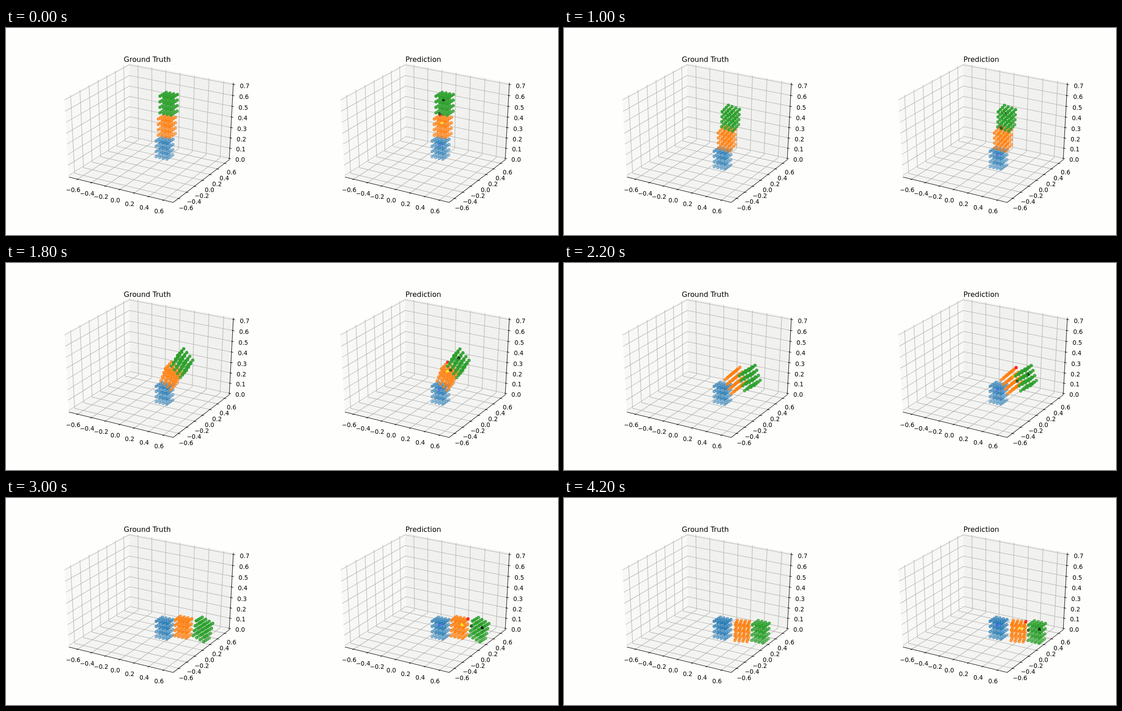
Write an HTML page with a canvas that moves like this. It is 1222 px wide and 458 px high and loops after 4.27 s.

```html
<!DOCTYPE html>
<html lang="en">
<head>
<meta charset="utf-8">
<title>Ground truth and prediction</title>
<style>
  html, body { margin: 0; width: 100%; height: 100%; overflow: hidden; background: #fefefc; }
  canvas { display: block; }
</style>
</head>
<body>
<canvas id="stage" width="1222" height="458"></canvas>
<script>
const ctx = document.getElementById('stage').getContext('2d');
const LOOP = 4270, STEP = 200 / 3, LAST_STEP = 63, PANEL = 611;

// Camera: elevation 30, azimuth -60, distance 10, looking at a unit cube centred on 0.
const COS = Math.sqrt(3) / 2, DIST = 10;
const SCALE_X = 2559.6, SCALE_Y = 1906.3, MID_X = 319.54, MID_Y = 226.53;
const E = 0.5 + 1 / 48, L = E + 0.0738;
const TICK_OUT = E + 1 / 60, TICK_IN = E - 1 / 120;

const depth = (x, y, z) => DIST - (COS / 2 * x - 0.75 * y + z / 2);

function project([x, y, z]) {
  const d = depth(x, y, z);
  return {
    x: MID_X + SCALE_X * (COS * x + y / 2) / d,
    y: MID_Y - SCALE_Y * (-x / 4 + COS / 2 * y + COS * z) / d,
    d
  };
}

// World point that appears at a screen position, for a known y.
function unproject(screenX, screenY, y) {
  const right = (screenX - MID_X) / SCALE_X, up = (MID_Y - screenY) / SCALE_Y;
  let x, z, d = DIST;
  for (let i = 0; i < 6; i++) {
    x = (right * d - y / 2) / COS;
    z = (up * d + x / 4 - COS / 2 * y) / COS;
    d = depth(x, y, z);
  }
  return [x, y, z];
}

function path(points) {
  ctx.beginPath();
  for (const point of points) {
    const p = project(point);
    ctx.lineTo(p.x, p.y);
  }
}

function line(color, ...points) {
  path(points);
  ctx.strokeStyle = color;
  ctx.stroke();
}

function pane(color, ...points) {
  path(points);
  ctx.fillStyle = color;
  ctx.fill();
}

function label(value, point) {
  const p = project(point);
  ctx.fillText(value.toFixed(1).replace('-', '−'), p.x - 0.4, p.y + 10);
}

function drawAxes(title) {
  pane('#f8f8f6', [-E, -E, -E], [-E, E, -E], [-E, E, E], [-E, -E, E]);
  pane('#f1f1ef', [-E, E, -E], [E, E, -E], [E, E, E], [-E, E, E]);
  pane('#f4f4f2', [-E, -E, -E], [E, -E, -E], [E, E, -E], [-E, E, -E]);

  const flat = Array.from({ length: 7 }, (_, i) => i - 3);
  const levels = Array.from({ length: 8 }, (_, i) => i);
  const grid = '#b0b0b0', ink = '#000';
  ctx.lineWidth = 1.06;
  for (const i of flat) {
    const at = i / 7;
    line(grid, [at, -E, -E], [at, E, -E], [at, E, E]);
    line(grid, [E, at, -E], [-E, at, -E], [-E, at, E]);
  }
  for (const i of levels) {
    const at = i / 7 - 0.5;
    line(grid, [-E, -E, at], [-E, E, at], [E, E, at]);
  }

  line(ink, [-E, -E, -E], [E, -E, -E], [E, E, -E], [E, E, E]);
  ctx.fillStyle = ink;
  ctx.textAlign = 'center';
  ctx.font = '13.26px "DejaVu Sans", sans-serif';
  for (const i of flat) {
    const at = i / 7;
    line(ink, [at, -TICK_OUT, -E], [at, -TICK_IN, -E]);
    line(ink, [TICK_OUT, at, -E], [TICK_IN, at, -E]);
    label(i / 5, [at, -L, -L]);
    label(i / 5, [L, at, -L]);
  }
  for (const i of levels) {
    const at = i / 7 - 0.5;
    line(ink, [TICK_OUT, E, at], [TICK_IN, E, at]);
    label(i / 10, [L, L, at]);
  }
  ctx.font = '15.91px "DejaVu Sans", sans-serif';
  ctx.fillText(title, 312.8, 75.2);
}

// Moments: release, landing, leaning, toppling, hitting the floor, rocking, rest.
const MOMENTS = [0, 6, 15, 27, 38, 52, LAST_STEP];
const LANDING = 6, IMPACT = 38;

// route: screen position of the centre at each moment; lean: exponent of the fall;
// rock: swing after impact; marks: coloured lattice points of the prediction.
const blocks = [
  {
    color: [31, 119, 180], marks: { '1,2,2': [20, 20, 255] },
    route: [[351, 265.5], [351, 288]], y: 0.036
  },
  {
    color: [255, 127, 14], marks: { '1,2,2': [255, 255, 0], '0,3,3': [255, 0, 0] },
    route: [[356, 217.5], [356.7, 251], [360.5, 245], [365.5, 250], [390.5, 271], [393.5, 294.5], [394.5, 294]],
    y: 0.03, drift: 0.04, lean: 2.6, rock: 6, yaw: 19
  },
  {
    color: [44, 160, 44], marks: { '1,2,2': [0, 0, 0], '1,0,0': [16, 84, 16] },
    route: [[360, 167.5], [358.7, 205], [368.5, 199.5], [389.8, 221.5], [426.5, 279], [440, 296], [435, 296]],
    y: 0.05, drift: 0.08, lean: 1.9, rock: 22, yaw: 0
  }
];

const clamp = u => Math.max(0, Math.min(1, u));

// Monotone cubic through the route; it stays at the last point.
function along(route, step, axis) {
  const slope = i => (route[i + 1][axis] - route[i][axis]) / (MOMENTS[i + 1] - MOMENTS[i]);
  const tangent = i => {
    if (i === 0 || i === route.length - 1) return 0;
    const a = slope(i - 1), b = slope(i);
    return a * b > 0 ? 2 * a * b / (a + b) : 0;
  };
  let i = 0;
  while (i < route.length - 2 && step >= MOMENTS[i + 1]) i++;
  const span = MOMENTS[i + 1] - MOMENTS[i], u = clamp((step - MOMENTS[i]) / span);
  const from = route[i][axis], to = route[i + 1][axis];
  return from + (to - from) * u * u * (3 - 2 * u)
    + span * u * (1 - u) * (tangent(i) * (1 - u) - tangent(i + 1) * u);
}

// Tilt towards +x, roll towards -y and yaw, in radians.
function attitude({ lean, rock, yaw }, step) {
  if (!lean) return [0, 0, 0];
  const fall = clamp((step - LANDING) / (IMPACT - LANDING));
  const settle = clamp((step - IMPACT) / (LAST_STEP - IMPACT));
  return [
    85 * fall ** lean + 6 * settle + rock * Math.sin(Math.PI * settle),
    13 * Math.sin(Math.PI * fall) - 3 * fall * (1 - settle),
    yaw * settle
  ].map(degrees => degrees * Math.PI / 180);
}

const turn = (a, b, angle) => [
  a * Math.cos(angle) - b * Math.sin(angle),
  a * Math.sin(angle) + b * Math.cos(angle)
];

function blockPoints(block, step, predicted) {
  const shift = predicted && block.lean ? clamp(step / 27) / 2 : 0;
  const y = block.y + (block.drift || 0) * (step / LAST_STEP) ** 2;
  const center = unproject(along(block.route, step, 0) + shift, along(block.route, step, 1) + shift, y);
  const [tilt, roll, yaw] = attitude(block, step);
  const points = [];
  for (let i = 0; i < 4; i++) for (let j = 0; j < 4; j++) for (let k = 0; k < 4; k++) {
    let [x, y, z] = [i, j, k].map(n => (n - 1.5) * 0.05);
    [z, x] = turn(z, x, tilt);
    [y, z] = turn(y, z, roll);
    [x, y] = turn(x, y, yaw);
    const p = project([center[0] + x / 1.4, center[1] + y / 1.4, center[2] + z / 0.7]);
    p.color = predicted && block.marks[[i, j, k]] || block.color;
    points.push(p);
  }
  return points;
}

// Nearer points are more opaque.
function drawPoints(step, predicted) {
  const points = blocks.flatMap(block => blockPoints(block, step, predicted));
  const nearness = points.map(p => 1 / p.d);
  const near = Math.max(...nearness), far = Math.min(...nearness);
  ctx.lineWidth = 1.33;
  points.forEach((p, i) => {
    const alpha = 0.3 + 0.7 * (nearness[i] - far) / (near - far);
    ctx.fillStyle = ctx.strokeStyle = `rgba(${p.color},${alpha})`;
    ctx.beginPath();
    ctx.arc(p.x, p.y, 2.96, 0, 2 * Math.PI);
    ctx.fill();
    ctx.stroke();
  });
}

function draw() {
  const time = performance.now() % LOOP;
  const step = Math.min(LAST_STEP, Math.floor((time + 3.5) / STEP));
  ctx.fillStyle = '#fefefc';
  ctx.fillRect(0, 0, 1222, 458);
  ['Ground Truth', 'Prediction'].forEach((title, panel) => {
    ctx.save();
    ctx.translate(panel * PANEL, 0);
    drawAxes(title);
    drawPoints(step, panel === 1);
    ctx.restore();
  });
  requestAnimationFrame(draw);
}
draw();
</script>
</body>
</html>
```
